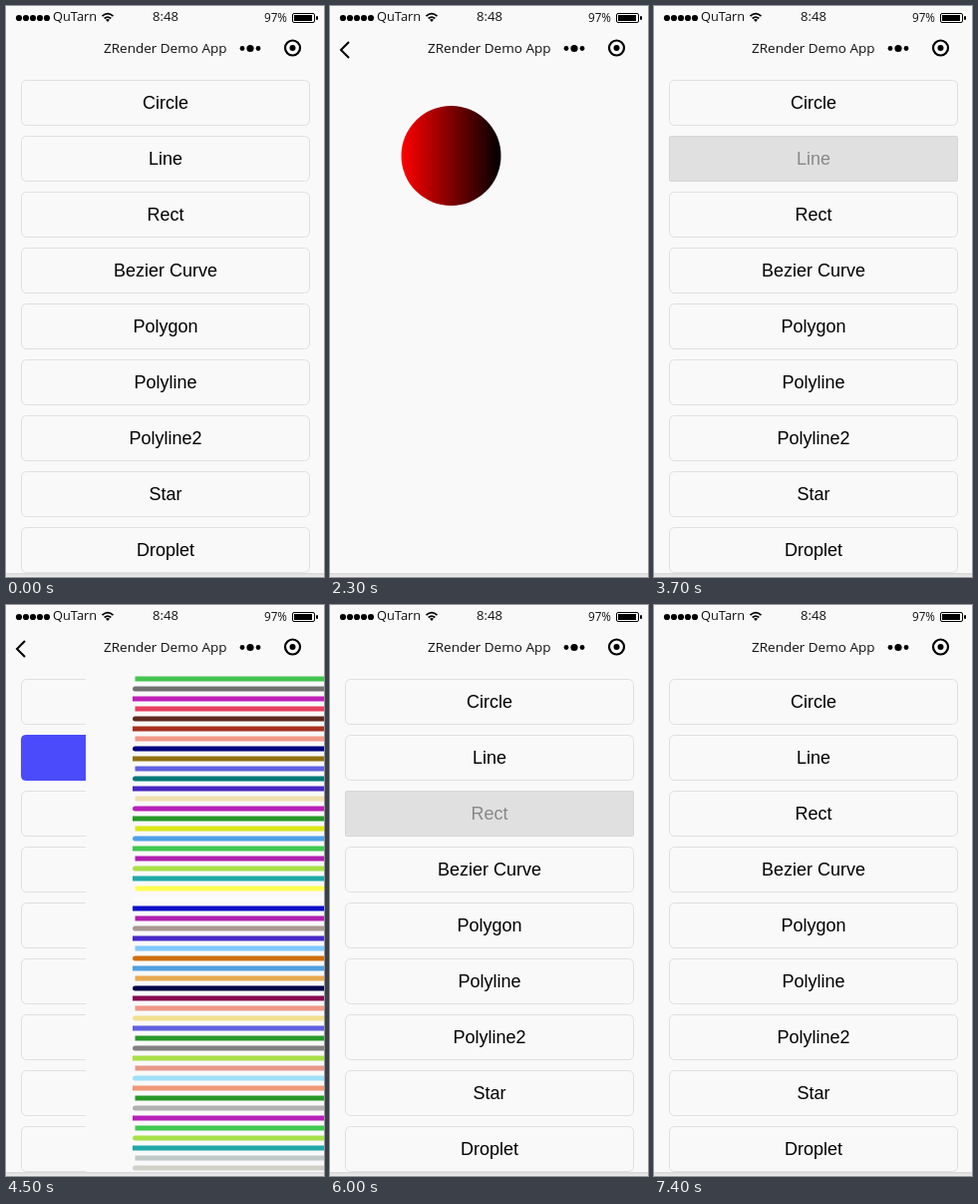
An HTML page that plays this animation: 319x572 px, repeating every 8000 ms.

```html
<!DOCTYPE html>
<html lang="en">
<head>
<meta charset="utf-8">
<title>ZRender Demo App</title>
<style>
  html, body { margin: 0; width: 100%; height: 100%; overflow: hidden; background: #f9f9f9; }
  svg { display: block; width: 319px; height: 572px; }
  .ui { font-family: "Open Sans", "Noto Sans", sans-serif; fill: #111; }
  .label { font: 18px "Liberation Sans", Arial, sans-serif; text-anchor: middle; }
</style>
</head>
<body>
<svg viewBox="0 0 319 572" xmlns="http://www.w3.org/2000/svg">
  <defs>
    <linearGradient id="fade"><stop stop-color="#f00"/><stop offset="1"/></linearGradient>
    <linearGradient id="edge" x2="0" y2="1">
      <stop stop-color="#d8d8d8"/><stop offset="1" stop-color="#ececec"/>
    </linearGradient>
    <clipPath id="view"><rect y="64" width="319" height="504"/></clipPath>
  </defs>
  <rect width="319" height="572" fill="#f9f9f9"/>
  <g clip-path="url(#view)">
    <g id="list"></g>
    <g id="page">
      <rect y="64" width="319" height="504" fill="#f9f9f9"/>
      <circle id="ball" r="50" fill="url(#fade)"/>
      <g id="lines" stroke-width="5"></g>
    </g>
  </g>
  <rect y="568" width="319" height="4" fill="url(#edge)"/>

  <g id="signal"></g>
  <text class="ui" x="47" y="15" font-size="12.8">QuTarn</text>
  <g fill="none" stroke="#000" stroke-width="1.7">
    <path d="M96.5 10.2Q102 5.200 107.500 10.200M98.700 12.500Q102 9.600 105.300 12.500"/>
  </g>
  <path d="M100 13.800Q102 12.300 104 13.800L102 16Z"/>
  <text class="ui" x="160" y="15" font-size="13.1" text-anchor="middle">8:48</text>
  <text class="ui" x="259" y="16" font-size="11.7">97%</text>
  <rect x="287.5" y="7.500" width="22" height="9" rx="1.500" fill="none" stroke="#000"/>
  <rect x="289" y="9" width="18" height="6"/>
  <rect x="311" y="10" width="2" height="4" rx="1"/>

  <path id="back" d="M19 36L11 44L19 52" fill="none" stroke="#000" stroke-width="2"/>
  <text class="ui" x="98" y="47" font-size="13.5">ZRender Demo App</text>
  <circle cx="237" cy="42.500" r="2.400"/>
  <circle cx="245" cy="42.500" r="3.600"/>
  <circle cx="253" cy="42.500" r="2.400"/>
  <circle cx="287.500" cy="42" r="7.500" fill="none" stroke="#000" stroke-width="2.200"/>
  <circle cx="287.500" cy="42" r="3"/>
</svg>
<script>
const LOOP = 8000, TICK = 100, WIDTH = 319;
const $ = id => document.getElementById(id);

function add(parent, tag, attrs) {
  const el = document.createElementNS('http://www.w3.org/2000/svg', tag);
  set(el, attrs);
  return parent.appendChild(el);
}
function set(el, attrs) {
  for (const key in attrs) el.setAttribute(key, attrs[key]);
}
const show = (el, on) => set(el, { visibility: on ? 'inherit' : 'hidden' });

for (let i = 0; i < 5; i++) add($('signal'), 'circle', { cx: 13 + 7 * i, cy: 12, r: 3.1 });

const names = ['Circle', 'Line', 'Rect', 'Bezier Curve', 'Polygon', 'Polyline', 'Polyline2', 'Star', 'Droplet'];
const buttons = names.map((name, i) => {
  const y = 74 + 56 * i;
  const box = add($('list'), 'rect', { x: 15.5, y: y + 0.5, width: 289, height: 45 });
  const text = add($('list'), 'text', { class: 'label', x: 160, y: y + 29 });
  text.textContent = name;
  return { box, text };
});

const looks = {
  idle: { fill: '#f9f9f9', stroke: '#e0e0e0', rx: 5, ink: '#000' },
  down: { fill: '#e0e0e0', stroke: '#d6d6d6', rx: 1, ink: '#888' },
  tapped: { fill: '#4b4bfb', stroke: '#4b4bfb', rx: 4, ink: '#48485a' },
  open: { fill: '#4b4bfb', stroke: '#4b4bfb', rx: 4, ink: '#000' }
};

const colors = ('44c450 707070 c020b8 e84060 602820 a83020 f09888 000080 907010 6060e0 ' +
  '007878 4828c0 f0e0b0 b820b8 289828 d8e818 50a0e8 40c850 b020b0 a8e048 ' +
  '20a8a8 ffff58 fbfbfb 1010c8 b020b0 a89890 4828c8 80c8ff d07010 50a0e0 ' +
  'e8a850 000048 880850 f09888 f0e090 6060e0 289828 808080 a8e048 e89888 ' +
  'a0e0f8 f09878 289828 b0b0b0 b820b8 40c850 a8e048 20a8a8 c0c8c8 d0d0c8').split(' ');
const caps = ['butt', 'round', 'square'];
colors.forEach((color, i) => add($('lines'), 'line', {
  x1: 49.5, x2: 270, y1: 74 + 10 * i, y2: 74 + 10 * i,
  stroke: '#' + color, 'stroke-linecap': caps[i % 3]
}));

// Each visit: press, tap, leave and end times, and [time, offset] keys of the sliding page.
const visits = [
  { press: 100, tap: 1400, leave: 3400, end: 3600,
    slide: [[1900, WIDTH], [2000, 106], [2100, 106], [2200, 0], [3300, 0], [3400, 110], [3500, 230], [3600, WIDTH]] },
  { press: 3700, tap: 4300, leave: 4700, end: 4700,
    slide: [[4300, WIDTH], [4400, 210], [4500, 80], [4600, 0], [4700, 0]] },
  { press: 6000, tap: 6800, leave: 7300, end: 7400,
    slide: [[6800, WIDTH], [6900, 100], [7000, 0], [7200, 0], [7300, 160], [7400, WIDTH]] }
];

function track(keys, t) {
  if (t <= keys[0][0]) return keys[0][1];
  for (let i = 1; i < keys.length; i++) {
    const [t0, a] = keys[i - 1], [t1, b] = keys[i];
    if (t <= t1) return a + (b - a) * (t - t0) / (t1 - t0);
  }
  return WIDTH;
}

function lookAt(visit, t) {
  if (!visit || t < visit.press || t >= visit.leave) return looks.idle;
  if (t < visit.tap) return looks.down;
  return t < visit.tap + TICK ? looks.tapped : looks.open;
}

function render(t) {
  buttons.forEach(({ box, text }, i) => {
    const { ink, ...look } = lookAt(visits[i], t);
    set(box, look);
    set(text, { fill: ink });
  });

  const at = visits.findIndex(v => t >= v.tap && t < v.end);
  const visit = visits[at];
  show($('back'), visit && t < visit.leave);
  show($('page'), visit);
  show($('ball'), at === 0);
  show($('lines'), at === 1);
  if (!visit) {
    show($('ball'), false);
    show($('lines'), false);
    return;
  }
  set($('page'), { transform: `translate(${track(visit.slide, t)} 0)` });

  // The ball runs right, then turns down at constant speed.
  const run = Math.max(0, 71.5 + 0.268 * (t - 2300));
  set($('ball'), { cx: 50 + Math.min(run, 200), cy: 150 + Math.max(0, run - 200) });
}

const start = performance.now();
function frame() {
  const t = (performance.now() - start) % LOOP;
  render(Math.floor(t / TICK) * TICK);
  requestAnimationFrame(frame);
}
frame();
</script>
</body>
</html>
```
